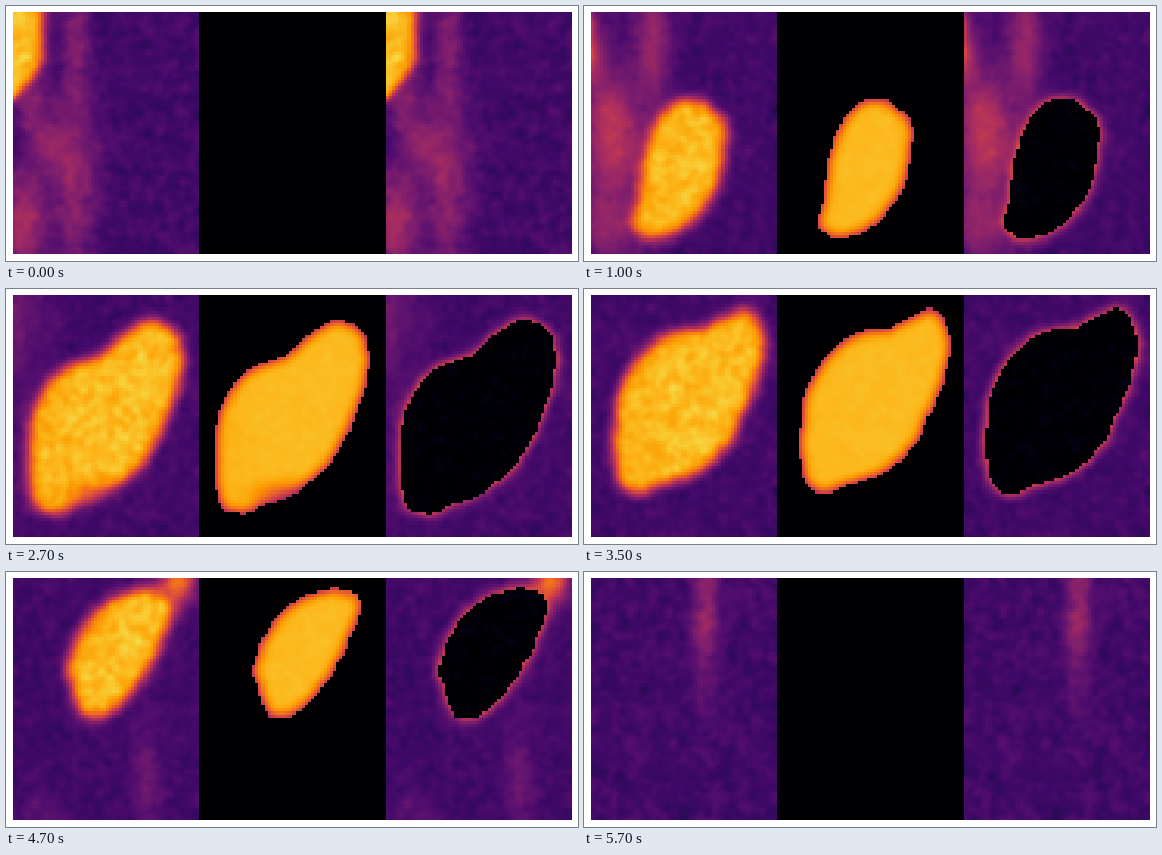
Animation, 572 px wide and 255 px high, one loop 5.8 s. Source, as a matplotlib script:

```python
import numpy as np
import matplotlib.pyplot as plt
from matplotlib.animation import FuncAnimation

W, H, FRAMES = 60, 78, 58
X, Y = np.meshgrid(np.arange(W) + 0.5, np.arange(H) + 0.5)
ANGLES = np.linspace(-np.pi, np.pi, 180, endpoint=False)


def smoother(n, sigma):
    i = np.arange(n)
    k = np.exp(-0.5 * ((i[:, None] - i) / sigma) ** 2)
    return k / k.sum(axis=1, keepdims=True)


def blur(a, sigma):
    return smoother(H, sigma) @ a @ smoother(W, sigma).T


# Lesion outlines at chosen slices, in cells
LOW = [(29, 28), (36, 27.7), (37.5, 30.5), (40.5, 32.5), (43.2, 35),
       (43.2, 43), (41.6, 51), (36, 63.5), (26.5, 71.6), (18.5, 73),
       (13.5, 70), (13.3, 65), (15.2, 61), (15.8, 53), (17.5, 45),
       (20, 37.5), (24, 31.5)]
LOBED = [(38.7, 14.8), (45.8, 15.5), (51.3, 21.3), (52, 26.5), (49.7, 36.8),
         (49, 43), (45.8, 51.3), (41, 58.4), (34.5, 63.5), (26.5, 68.4),
         (22.3, 72.3), (15.2, 74.8), (10.3, 73.2), (7, 68.4), (5.5, 62.6),
         (5.2, 51.3), (7, 43.2), (12.6, 36), (20.6, 30.6), (24.2, 25.2),
         (29.7, 19)]
WIDE = [(42.6, 8.4), (49, 8.7), (53.2, 12.3), (54.8, 20.6), (53.9, 27),
        (50.6, 36.8), (46.8, 46.5), (42.6, 53.5), (36, 60), (29.7, 64.5),
        (21, 67.4), (15.2, 70.6), (8, 69.7), (5.8, 64.8), (5.5, 56),
        (5.5, 46.5), (6.5, 37.4), (10.3, 30.3), (15.2, 24.5), (20, 22.3),
        (28, 20), (34.5, 13.5)]
TIPPED = [(49, 4.2), (52.3, 5.2), (55.2, 11.6), (55.8, 16.8), (54.5, 24),
          (51.3, 33.5), (48, 40), (42.6, 50.3), (37, 55.5), (29.7, 59.4),
          (22.3, 61), (16.8, 63.9), (12, 63.9), (8.7, 59.4), (7.4, 51.3),
          (7.7, 41.6), (10.3, 28.7), (15.2, 20.6), (21, 14.8), (28, 11.6),
          (36, 11), (42.6, 7.1)]
HIGH = [(37.7, 4.5), (44, 3.4), (50.6, 5), (52, 9.4), (48.4, 19),
        (44.2, 27.7), (39.4, 35), (34, 41.6), (28, 45.2), (22.6, 45.2),
        (20, 40), (19, 35), (17.2, 31), (18.7, 24.5), (22.3, 16.8),
        (28, 10), (33, 6.1)]


def polar(points):
    p = np.array(points, float)
    c = p.mean(axis=0)
    dx, dy = (p - c).T
    r = np.interp(ANGLES, np.arctan2(dy, dx), np.hypot(dx, dy),
                  period=2 * np.pi)
    return c, r ** 2


def empty(x, y):
    return np.array([x, y], float), np.zeros_like(ANGLES)


KEYS = [(3, empty(27, 54)), (10, polar(LOW)), (19, polar(LOBED)),
        (27, polar(WIDE)), (35, polar(TIPPED)), (47, polar(HIGH)),
        (54, empty(39, 12))]


def lesion(t):
    for (t0, (c0, a0)), (t1, (c1, a1)) in zip(KEYS, KEYS[1:]):
        if t0 < t <= t1:
            k = (t - t0) / (t1 - t0)
            cx, cy = c0 + k * (c1 - c0)
            r = np.sqrt(a0 + k * (a1 - a0))
            at = np.arctan2(Y - cy, X - cx)
            return np.hypot(X - cx, Y - cy) < np.interp(
                at, ANGLES, r, period=2 * np.pi)
    return np.zeros((H, W), bool)


# Soft spots: slice, spread in slices, x, y, width, height, strength
TISSUE = [(0, 6, 20, 8, 3, 14, 0.15), (0, 6, 19, 45, 6, 14, 0.14),
          (0, 6, 11, 43, 4, 6, 0.10), (0, 5, 6, 30, 3, 6, 0.14),
          (0, 6, 3, 68, 5, 11, 0.24), (0, 5, 20, 66, 4, 14, 0.11),
          (10, 4, 0, 14, 3, 7, 0.22), (9, 4, 7, 40, 6, 14, 0.28),
          (10, 4, 20, 10, 4, 14, 0.17), (10, 4, 9, 70, 8, 7, 0.12),
          (19, 4, 10, 3, 4, 11, 0.25), (19, 5, 2, 50, 4, 30, 0.12),
          (19, 4, 10, 26, 5, 8, 0.10), (27, 3, 0, 5, 4, 14, 0.10),
          (47, 4, 53, 1, 4, 5, 0.50), (47, 3, 9, 75, 5, 4, 0.06)]
DIM = [(19, 4, 9, 52, 5, 12, 0.09), (27, 3, 27, 65, 6, 3, 0.20)]


def gauss(x, y, sx, sy):
    return np.exp(-0.5 * (((X - x) / sx) ** 2 + ((Y - y) / sy) ** 2))


def spots(items, t):
    return sum(a * np.exp(-0.5 * ((t - t0) / st) ** 2) * gauss(x, y, sx, sy)
               for t0, st, x, y, sx, sy, a in items)


def streak(t):
    k = max((t - 47) / 10, -1)
    strength = np.clip(0.1 + 0.1 * k, 0, 0.2)
    return strength * gauss(43 - 6 * k, 66 - 58 * k, 3.1, 14 + 3 * k)


def rib(t):
    edge = 9.8 - 10.5 * (np.clip(Y - 14, 0, None) / 15) ** 1.6 - 1.05 * t
    return 1 / (1 + np.exp(np.clip((X - edge) / 1.1, -50, 50)))


def make_noise():
    rng = np.random.default_rng(4)
    vol = np.array([blur(s, 1.0)
                    for s in rng.standard_normal((FRAMES, H, W))])
    vol = np.tensordot(smoother(FRAMES, 0.7), vol, axes=1)
    return vol / vol.std()


NOISE = make_noise()


def panels(t):
    mask = lesion(t)
    body = blur(mask.astype(float), 1.9)
    tissue = 0.2 + spots(TISSUE, t) + streak(t)
    bone = rib(t)
    tissue = tissue * (1 - bone) + 0.85 * bone
    clean = tissue * (1 - body) + (0.845 - spots(DIM, t)) * body
    grain = NOISE[t] * (0.014 + 0.006 * body)
    scan = clean + grain
    part = np.where(mask, clean + 0.2 * grain, 0)
    rest = np.where(mask, 0.6 * np.abs(grain), scan)
    return np.hstack([scan, part, rest])


DPI = 64
fig = plt.figure(figsize=(572 / DPI, 255 / DPI), dpi=DPI, facecolor="white")
ax = fig.add_axes([7 / 572, 7 / 255, 559 / 572, 242 / 255])
ax.axis("off")
image = ax.imshow(panels(0), cmap="inferno", vmin=0, vmax=1,
                  aspect="auto", interpolation="nearest")


def update(t):
    image.set_data(panels(t))
    return [image]


anim = FuncAnimation(fig, update, frames=FRAMES, interval=100,
                     repeat=True, repeat_delay=0)
plt.show()
```
